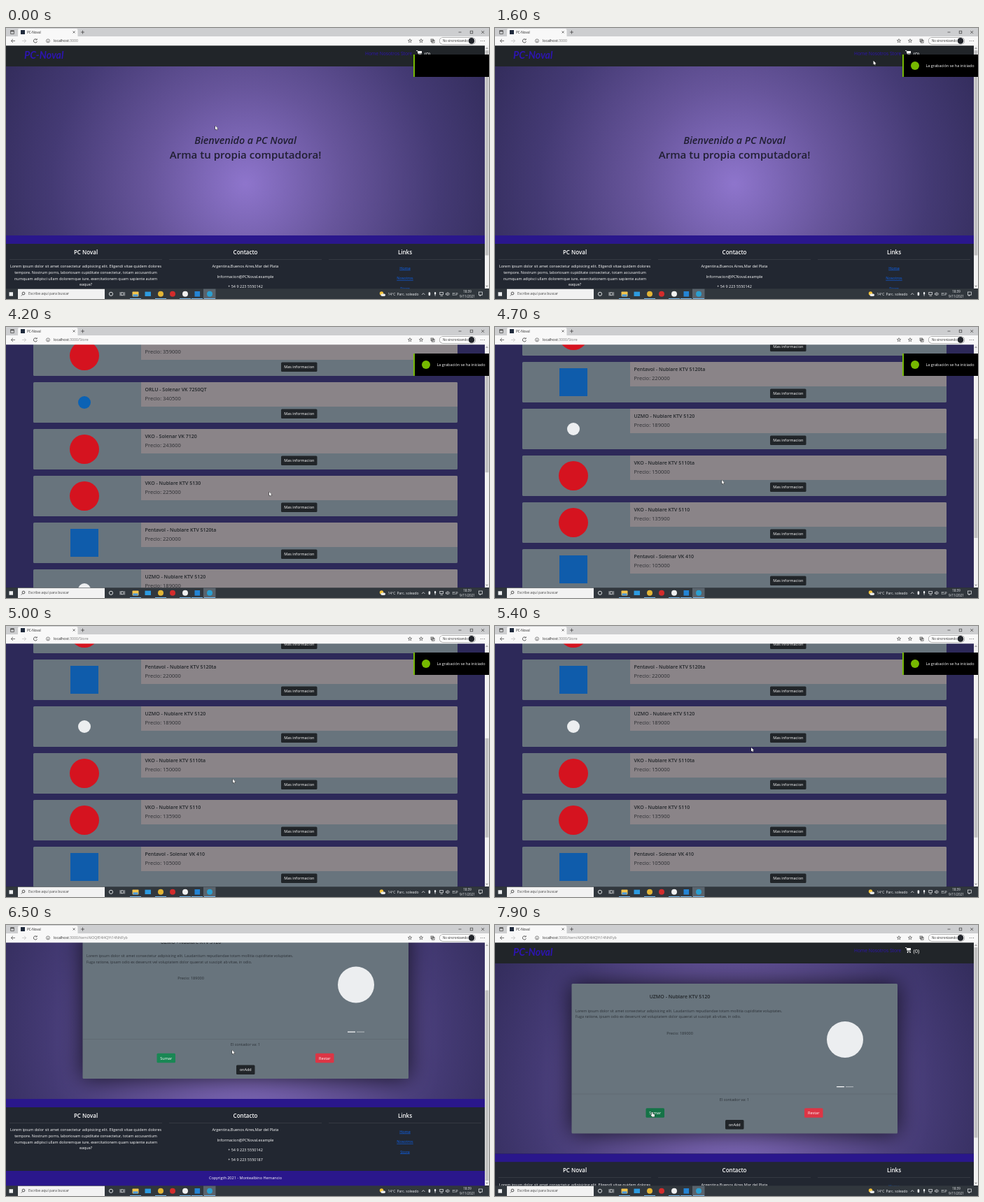
Write an HTML page with a canvas that moves like this. It is 690x388 px and loops after 8 s.

```html
<!DOCTYPE html>
<html lang="es">
<head>
<meta charset="utf-8">
<title>PC-Noval</title>
<style>
html, body { margin: 0; width: 100%; height: 100%; overflow: hidden; background: #212529; }
canvas { display: block; width: 690px; height: 388px; }
</style>
</head>
<body>
<canvas id="stage"></canvas>
<script>
const W = 690, H = 388, LOOP = 8000, TOP = 25, VIEW = 348;
const canvas = document.getElementById('stage');
const dpr = window.devicePixelRatio || 1;
canvas.width = W * dpr;
canvas.height = H * dpr;
const c = canvas.getContext('2d');

const DARK = '#212529', INDIGO = '#2a178c', VIOLET = '#2d15b0', LINK = '#0d62ee', CARD = '#68747d';
const SANS = '"Open Sans", sans-serif';
const OPEN_STORE = 2200, LOGOS = 3000, OPEN_ITEM = 5900;

const products = [
  ['VKO - Nublare KTV 5140', 359000, 'red'],
  ['ORLU - Solenar VK 7250QT', 340500, 'sky'],
  ['VKO - Solenar VK 7120', 243600, 'red'],
  ['VKO - Nublare KTV 5130', 225000, 'red'],
  ['Pentavol - Nublare KTV 5120ta', 220000, 'blue'],
  ['UZMO - Nublare KTV 5120', 189000, 'white'],
  ['VKO - Nublare KTV 5110ta', 150000, 'red'],
  ['VKO - Nublare KTV 5110', 135900, 'red'],
  ['Pentavol - Solenar VK 410', 105000, 'blue']
];
const marks = {
  red: ['#d5131f', 21, false], sky: ['#0b62b4', 9, false],
  blue: ['#0f5cab', 20, true], white: ['#eceef0', 9, false]
};
const categories = [
  ['Procesadores', 211.5], ['Motherboards', 252], ['Tarjetas Graficas', 297],
  ['Memoria RAM', 342.5], ['Fuentes', 376.5], ['Discos Rigidos', 410.5],
  ['Coolers', 444], ['Gabinetes', 472.5]
];
const pointerPath = [
  [0, 299, 140], [900, 330, 122], [1800, 571, 36], [2200, 571, 36], [2700, 317, 110],
  [3500, 342, 170], [4200, 376, 236], [4700, 324, 219], [5000, 324, 219],
  [5400, 366, 174], [5700, 416, 157], [5900, 416, 157], [6400, 323, 179],
  [7200, 323, 179], [7700, 224, 268], [8000, 224, 268]
];
const storeScroll = [[0, 0], [3900, 0], [4200, 84], [4700, 314], [4900, 316], [8000, 316]];
const itemScroll = [[0, 78.5], [6700, 78.5], [7200, 0], [8000, 0]];

function track(keys, t, col = 1) {
  let i = 1;
  while (i < keys.length - 1 && keys[i][0] < t) i++;
  const a = keys[i - 1], b = keys[i];
  const k = Math.min(1, Math.max(0, (t - a[0]) / (b[0] - a[0])));
  return a[col] + (b[col] - a[col]) * k * k * (3 - 2 * k);
}

function rect(x, y, w, h, fill, r = 0) {
  c.fillStyle = fill;
  c.beginPath();
  c.roundRect(x, y, w, h, r);
  c.fill();
}
function dot(x, y, r, fill) {
  c.fillStyle = fill;
  c.beginPath();
  c.arc(x, y, r, 0, 7);
  c.fill();
}
function ring(x, y, r, color, w = 0.8) {
  c.strokeStyle = color;
  c.lineWidth = w;
  c.beginPath();
  c.arc(x, y, r, 0, 7);
  c.stroke();
}
function line(points, color, w = 0.7) {
  c.strokeStyle = color;
  c.lineWidth = w;
  c.beginPath();
  for (let i = 0; i < points.length; i += 2) c.lineTo(points[i], points[i + 1]);
  c.stroke();
}
function box(x, y, w, h, color, lw = 0.7) {
  c.strokeStyle = color;
  c.lineWidth = lw;
  c.strokeRect(x, y, w, h);
}
// y is the optical middle of the line
function text(s, x, y, size, color, align = 'left', style = '', face = SANS) {
  c.font = `${style} ${size}px ${face}`;
  c.fillStyle = color;
  c.textAlign = align;
  c.fillText(s, x, y + size * 0.35);
}
function link(s, x, y, size, color) {
  text(s, x, y, size, color, 'center');
  const w = c.measureText(s).width;
  rect(x - w / 2, y + size * 0.46, w, 0.6, color);
}
function button(s, x, y, w, fill) {
  rect(x, y, w, 13.5, fill, 1.5);
  text(s, x + w / 2, y + 6.8, 5.5, '#fff', 'center');
}

function glow(bottom, total, scroll) {
  const cy = TOP + total / 2 - scroll;
  const g = c.createRadialGradient(342, cy, 0, 342, cy, Math.hypot(342, total / 2));
  g.addColorStop(0, '#8e75cc');
  g.addColorStop(0.35, '#67559b');
  g.addColorStop(0.7, '#443a74');
  g.addColorStop(1, '#312b59');
  rect(0, TOP, 684, bottom - TOP, g);
}

function header(y) {
  rect(0, y, 684, 30, DARK);
  text('PC-Noval', 26, y + 14.3, 14.2, VIOLET, 'left', 'italic bold', 'Lato, sans-serif');
  text('Home Nosotros Store', 513, y + 12, 6.7, VIOLET);
  line([586, y + 7.5, 588, y + 7.5, 589.5, y + 12.2, 593.4, y + 12.2], '#fff', 0.8);
  rect(588.2, y + 8, 5.8, 3.2, '#fff');
  dot(589.6, y + 14, 0.9, '#fff');
  dot(593, y + 14, 0.9, '#fff');
  text('(0)', 597.5, y + 12.6, 7.6, '#fff');
}

function footer(y) {
  rect(0, y, 684, 12, INDIGO);
  rect(0, y + 12, 684, 91, '#222731');
  rect(0, y + 103, 684, 23, INDIGO);
  ['PC Noval', 'Contacto', 'Links'].forEach((s, i) => {
    const x = 114 + i * 228;
    text(s, x, y + 24, 8, '#fff', 'center', '600');
    rect(x - 109, y + 34, 218, 0.6, '#484d55');
  });
  [
    'Lorem ipsum dolor sit amet consectetur adipisicing elit. Eligendi vitae quidem dolores',
    'tempore. Nostrum porro, laboriosam cupiditate consectetur, totam accusantium',
    'numquam adipisci ullam doloremque iure, exercitationem quam sapiente autem',
    'eaque?'
  ].forEach((s, i) => text(s, 114, y + 44.5 + i * 8.65, 5.45, '#fff', 'center'));
  [
    'Argentina,Buenos Aires,Mar del Plata', 'Informacion@PCNoval.example',
    '+ 54 9 223 5550142', '+ 54 9 223 5550187'
  ].forEach((s, i) => text(s, 342, y + 44.5 + i * 14.3, 5.5, '#fff', 'center'));
  ['Home', 'Nosotros', 'Store'].forEach((s, i) => link(s, 570, y + 47 + i * 14.4, 5.5, LINK));
  text('Copyrigth 2021 - Montealbino Hernancio', 342, y + 113.5, 5.5, '#fff', 'center');
}

function home() {
  glow(297, 396, 0);
  header(TOP);
  text('Bienvenido a PC Noval', 342, 161, 14.3, '#211f33', 'center', 'italic 600');
  text('Arma tu propia computadora!', 342, 182, 15.1, '#211f33', 'center', '600');
  footer(297);
  return [396, 0];
}

function store(t) {
  const loaded = t >= LOGOS, scroll = track(storeScroll, t);
  const pitch = loaded ? 67 : 64, height = loaded ? 58 : 55;
  rect(0, TOP, 684, VIEW, '#2d2959');
  header(TOP - scroll);
  rect(0, 55 - scroll, 684, 14, DARK);
  rect(0, 69 - scroll, 684, 0.8, '#8d9096');
  categories.forEach(([s, x]) => link(s, x, 62 - scroll, 5.4, '#1650d8'));
  products.forEach(([name, price, mark], i) => {
    const y = 96 + i * pitch - scroll;
    rect(39, y, 606, height, CARD, 1.6);
    rect(193, y, 452, 35, '#8a8488', [0, 1.6, 0, 0]);
    text(name, 198.5, y + 10.5, 7, DARK, 'left', '600');
    text('Precio: ' + price, 198.5, y + 23.5, 7.5, '#2b2d31');
    button('Mas informacion', 393, y + 38.5, 51.5, DARK);
    if (loaded) {
      const [color, r, square] = marks[mark];
      if (square) rect(112 - r, y + 29 - r, r * 2, r * 2, color);
      else dot(112, y + 29, r, color);
    }
  });
  const end = 96 + products.length * pitch + 20;
  footer(end - scroll);
  return [end + 100, scroll];
}

function item(t) {
  const s = track(itemScroll, t);
  glow(327.5 - s, 426.5, s);
  header(TOP - s);
  c.save();
  c.shadowColor = 'rgba(0,0,0,.75)';
  c.shadowBlur = 32 * dpr;
  rect(109.5, 84 - s, 465.5, 214.5, CARD, 1.5);
  c.restore();
  text('UZMO - Nublare KTV 5120', 264, 103 - s, 7, DARK, 'center', '600');
  text('Lorem ipsum dolor sit amet consectetur adipisicing elit. Laudantium repudiandae totam mollitia cupiditate voluptates.', 115, 123 - s, 5.38, '#2b3036');
  text('Fuga ratione, ipsam odio ex deserunt vel voluptatem dolor quaerat ut suscipit ab vitae, in odio.', 115, 131.6 - s, 5.38, '#2b3036');
  text('Precio: 189000', 264, 154.8 - s, 5.5, '#2b3036', 'center');
  dot(500, 164 - s, 26, '#eceef0');
  rect(488, 231 - s, 11, 1.2, '#fff');
  rect(501, 231 - s, 11, 1.2, '#a9b0b5');
  rect(110, 241.7 - s, 465, 0.6, '#596169');
  text('El contador va: 1', 342, 249.6 - s, 5.5, '#2b3036', 'center');
  button('Sumar', 215.5, 262.3 - s, 26.5, t >= 7600 ? '#157347' : '#198754');
  button('Restar', 442, 262.3 - s, 26.5, '#dc3545');
  button('onAdd', 329, 279 - s, 26.5, DARK);
  footer(327.5 - s);
  return [426.5, s];
}

function scrollbar([total, scroll]) {
  rect(684, TOP, 6, VIEW, '#f1f1f1');
  const thumb = 334 * VIEW / total;
  rect(684.6, 32 + 334 * scroll / total, 4.8, thumb, '#c1c1c1');
  line([685.7, 30, 687, 28.3, 688.3, 30], '#555');
  line([685.7, 368.6, 687, 370.3, 688.3, 368.6], '#555');
}

function browser(path) {
  const ink = '#3b3b3b';
  rect(0, 0, W, 12.5, '#cdced0');
  rect(17, 1, 85.5, 12, '#f8f8f8', [2, 2, 0, 0]);
  rect(0, 12, W, 13.2, '#f8f8f8');
  box(6.7, 3.7, 4.6, 4.6, ink);
  line([6.7, 4.7, 11.3, 4.7], ink, 1);
  rect(21, 3, 6, 6, '#1f2a3c');
  text('PC-Noval', 30, 6, 4.7, '#222');
  line([95.6, 4.4, 98.6, 7.4], ink); line([98.6, 4.4, 95.6, 7.4], ink);
  line([107, 6, 112, 6], ink); line([109.5, 3.5, 109.5, 8.5], ink);
  line([646.5, 6, 650.5, 6], ink);
  box(663.2, 4.2, 3.6, 3.6, ink);
  line([679.2, 4, 683.2, 8], ink); line([683.2, 4, 679.2, 8], ink);

  line([10, 15.8, 7.4, 18.4, 10, 21], ink); line([7.4, 18.4, 13, 18.4], ink);
  line([26, 15.8, 28.6, 18.4, 26, 21], '#bbb'); line([23, 18.4, 28.6, 18.4], '#bbb');
  c.strokeStyle = ink;
  c.lineWidth = 0.8;
  c.beginPath();
  c.arc(42, 18.4, 2.6, 0.3, 5.5);
  c.stroke();
  line([44.4, 15.4, 44.2, 17, 42.4, 17], ink);
  ring(60, 18.4, 2.5, ink, 0.6);
  line([60, 17.8, 60, 20], ink);
  text('localhost', 68, 18.3, 5.2, '#222');
  const w = c.measureText('localhost').width;
  text(':3000' + path, 68 + w, 18.3, 5.2, '#777');
  [577, 593].forEach(x => {
    const star = [];
    for (let i = 0; i <= 10; i++) {
      const r = i % 2 ? 1.2 : 2.8, a = i * Math.PI / 5 - Math.PI / 2;
      star.push(x + r * Math.cos(a), 18.4 + r * Math.sin(a));
    }
    line(star, ink, 0.6);
  });
  box(607, 16, 3.6, 3.6, ink); box(608.4, 17.5, 3.6, 3.6, ink);
  rect(619, 13.2, 52, 10.4, '#777', 5.2);
  rect(619.5, 13.7, 51, 9.4, '#fff', 4.7);
  text('No sincronizando', 624, 18.3, 4.4, '#222');
  dot(665, 18.4, 4.3, '#22252b');
  [678.5, 681, 683.5].forEach(x => dot(x, 18.4, 0.5, ink));
}

function taskbar() {
  const pale = '#eef0f2';
  rect(0, 373.3, W, 15, '#31373d');
  rect(4.5, 378.2, 5.5, 5.5, pale);
  rect(17, 373.8, 124, 14.2, '#f2f2f2');
  ring(25, 380, 1.9, '#333'); line([23.7, 381.5, 21.8, 383.5], '#333');
  text('Escribe aquí para buscar', 32, 380.7, 5.1, '#444');
  ring(150, 380.8, 2.6, pale, 0.9);
  box(164.5, 378.8, 3.2, 4, pale); line([169.4, 378.2, 169.4, 383.4], pale); line([163, 378.2, 163, 383.4], pale);
  rect(180.5, 377.4, 9, 7, '#f3c44c', 0.8);
  rect(181.5, 381.4, 7, 3, '#4a9ade');
  rect(198.5, 377.6, 8.5, 6.4, '#2d9be0');
  rect(282, 373.6, 17.5, 14.4, '#59636c');
  [[221, '#e3b536'], [238, '#d42c2c'], [256, '#f0f0f0'], [291, '#2b9fd0']].forEach(([x, f]) => dot(x, 380.8, 4, f));
  rect(269.5, 377, 7.6, 7.6, '#2484d4');
  [185, 221, 256, 273, 291].forEach(x => rect(x - 8, 387, 16, 1, '#76b9ed'));
  dot(536.5, 380, 2.7, '#f5c33b');
  rect(535.5, 380.5, 6.5, 3.4, '#e6e9ec', 1.7);
  text('14°C', 545.5, 381, 5, pale);
  text('Parc. soleado', 558.5, 381, 5, pale);
  line([594, 382, 596.2, 379.7, 598.4, 382], pale);
  rect(603.6, 378.2, 2.6, 5, pale, 1.2);
  rect(612, 378, 2.2, 3.6, pale, 1); line([613.1, 381, 613.1, 383.8], pale);
  box(619.8, 378.5, 4.6, 3.2, pale); line([620.5, 383.4, 624, 383.4], pale);
  line([628.5, 380, 629.5, 380, 631, 378.5, 631, 383, 629.5, 381.8, 628.5, 381.8, 628.5, 380], pale);
  line([632.4, 379, 633.3, 380.8, 632.4, 382.6], pale);
  text('ESP', 637.5, 381, 4.7, pale);
  text('18:39', 659, 377.8, 4.6, pale, 'center');
  text('9/11/2021', 659, 384.2, 4.6, pale, 'center');
  box(675.5, 378, 5, 4.2, pale); line([677, 382.2, 677, 384, 678.8, 382.2], pale);
}

function notice(t) {
  if (t >= 6000) return;
  const x = 582 + 108 * Math.max(0, (t - 5700) / 300) ** 2;
  rect(x, 38, 108, 32, '#000');
  rect(x, 38, 2, 32, '#76b900');
  c.globalAlpha = Math.min(1, Math.max(0, (t - 200) / 400));
  dot(x + 18, 54, 6, '#76b900');
  text('La grabación se ha iniciado', x + 33.5, 54.3, 5.5, '#fff');
  c.globalAlpha = 1;
}

function pointer(t) {
  const x = track(pointerPath, t), y = track(pointerPath, t, 2);
  const hand = (t >= 1700 && t < OPEN_STORE) || (t >= 5600 && t < OPEN_ITEM) || t >= 7600;
  const shape = hand
    ? [0, 0, 1.2, 0, 1.2, 2.5, 4, 3.2, 3.8, 6.5, 0.4, 6.5, -1.6, 3.8, -0.8, 3.2, 0, 4]
    : [0, 0, 0, 5.6, 1.3, 4.5, 2.1, 6.3, 3, 5.9, 2.2, 4.2, 3.9, 4.1];
  c.beginPath();
  for (let i = 0; i < shape.length; i += 2) c.lineTo(x + shape[i], y + shape[i + 1]);
  c.closePath();
  c.strokeStyle = '#222';
  c.lineWidth = 0.9;
  c.stroke();
  c.fillStyle = '#fff';
  c.fill();
}

function draw(t) {
  c.setTransform(dpr, 0, 0, dpr, 0, 0);
  rect(0, 0, W, H, DARK);
  let page, path;
  if (t < OPEN_STORE) { page = home(); path = ''; }
  else if (t < OPEN_ITEM) { page = store(t); path = '/Store'; }
  else { page = item(t); path = '/item/AlOQfE4l4QYt14NhlFyb'; }
  scrollbar(page);
  browser(path);
  taskbar();
  notice(t);
  pointer(t);
}

function frame() {
  draw(Math.floor(performance.now() % LOOP / 100) * 100);
  requestAnimationFrame(frame);
}
frame();
</script>
</body>
</html>
```
